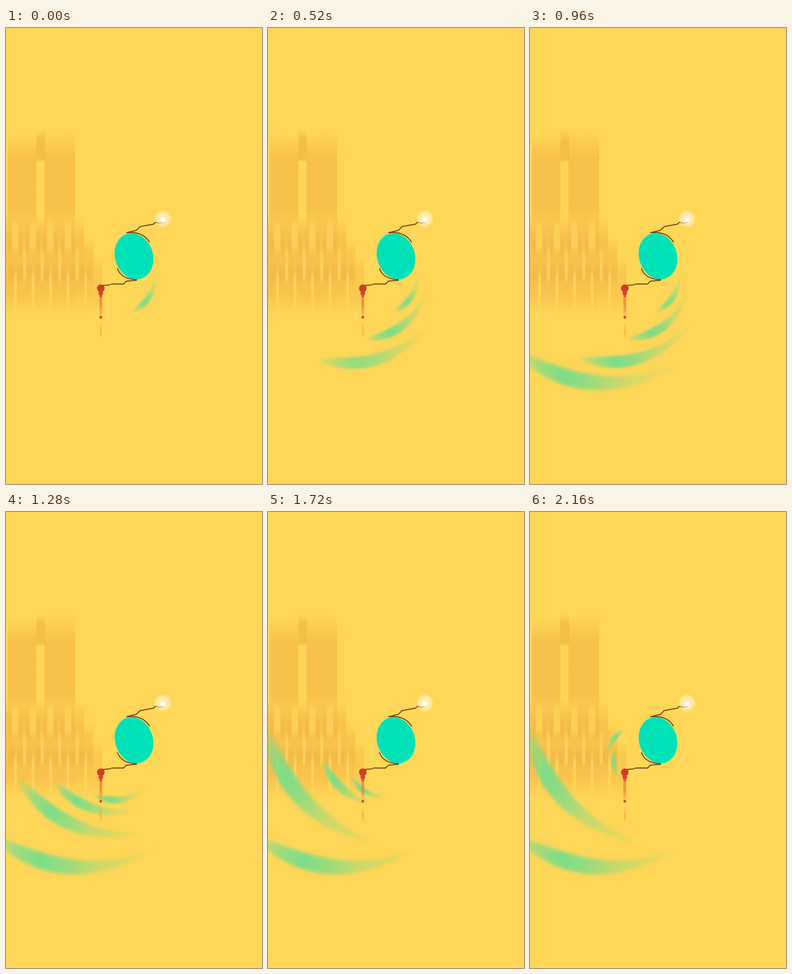
An HTML page with a canvas that plays this animation: 540x960 px, repeating every 2.2 s.

```html
<!DOCTYPE html>
<html lang="en">
<head>
<meta charset="utf-8">
<title>Orbiting arcs</title>
<style>
  html, body { margin: 0; width: 100%; height: 100%; overflow: hidden; background: #ffd758; }
  canvas { display: block; width: 100vw; height: 100vh; }
</style>
</head>
<body>
<canvas id="stage" width="540" height="960"></canvas>
<script>
const LOOP = 2200, STEP = 40, FADE = 110;
const BODY = { x: 270, y: 480.5 };
const ctx = document.getElementById('stage').getContext('2d');

// Each pair runs from the inner ring to the outer one; lift and turn bend that run.
const waves = [
  { rings: 4, radius: [87, 292], angle: [66, 114], tilt: [-38, -22], length: [103, 370], lift: 1.2, turn: 1 },
  { rings: 3, radius: [127, 217], angle: [101, 123], tilt: [-20, -12], length: [122, 312], lift: 1.2, turn: 0.3 },
  { rings: 3, radius: [126, 229], angle: [117, 142], tilt: [-3, -9], length: [95, 376], lift: 2, turn: 0.55 },
  { rings: 2, radius: [99, 109], angle: [176, 147], tilt: [28, 17], length: [76, 72], lift: 1, turn: 1 }
];

const rad = deg => deg * Math.PI / 180;
const mix = ([a, b], p) => a + (b - a) * p;
const ramp = v => { v = Math.max(0, Math.min(1, v)); return v * v * (3 - 2 * v); };

const startOf = (wave, ring) => wave ? 600 + 440 * wave + 60 * ring : 280 * ring - 120;

// An arc stays until the next wave has one for the same ring.
const endOf = (wave, ring) =>
  waves[wave + 1]?.rings > ring ? startOf(wave + 1, ring) : Infinity;

function shade(g, rgb, stops) {
  for (const [at, alpha] of stops) g.addColorStop(at, `rgba(${rgb},${alpha})`);
  return g;
}

function fadeBar(c, x, y, w, h, rgb, alpha, from, to) {
  c.fillStyle = shade(c.createLinearGradient(0, y, 0, y + h), rgb,
    [[0, 0], [from, alpha], [to, alpha], [1, 0]]);
  c.fillRect(x, y, w, h);
}

function makeBackdrop() {
  const layer = document.createElement('canvas');
  layer.width = 540;
  layer.height = 960;
  const c = layer.getContext('2d');
  const amber = '244,184,70', dark = '228,162,52', light = '255,213,92';
  c.fillStyle = '#ffd758';
  c.fillRect(0, 0, 540, 960);
  c.filter = 'blur(0.7px)';

  fadeBar(c, 4, 226, 60, 210, amber, 0.7, 0.22, 0.75);
  fadeBar(c, 81, 218, 65, 218, amber, 0.7, 0.25, 0.75);
  fadeBar(c, 64, 213, 18, 70, dark, 0.45, 0.35, 0.9);

  fadeBar(c, -5, 395, 151, 207, amber, 0.66, 0.18, 0.78);
  for (let i = 0; i < 3; i++) {
    fadeBar(c, 146 + 19 * i, 400 + 42 * i, 19, 200 - 42 * i, amber, 0.65 - 0.1 * i, 0.22, 0.74);
  }
  for (let x = 0; x < 185; x += 37) {
    for (const dx of [5, 23]) fadeBar(c, x + dx, 492, 13, 48, dark, 0.22, 0.3, 0.7);
    if (x < 148) {
      for (const dx of [4, 27]) fadeBar(c, x + dx, 430, 8, 52, dark, 0.2, 0.4, 0.75);
      fadeBar(c, x + 13, 400, 13, 74, light, 0.7, 0.25, 0.8);
      fadeBar(c, x + 36, 460, 7, 76, light, 0.7, 0.2, 0.85);
    }
    fadeBar(c, x + 17, 510, 6, 90, light, 0.85, 0.2, 0.85);
  }
  return layer;
}

function drawArc(wave, ring, t) {
  const w = waves[wave];
  const enter = ramp((t - startOf(wave, ring)) / FADE);
  const alpha = enter * (1 - ramp((t - endOf(wave, ring)) / FADE));
  if (!alpha) return;

  const run = ring / (w.rings - 1);
  const far = run ** w.lift, turned = run ** w.turn;
  const length = mix(w.length, far);
  const width = 4 + 0.085 * length, sag = 0.16 * length;

  ctx.save();
  ctx.translate(BODY.x, BODY.y);
  ctx.rotate(rad(mix(w.angle, turned) - 90 - 7 * (1 - enter)));
  ctx.translate(0, mix(w.radius, far));
  ctx.rotate(rad(mix(w.tilt, turned)));
  ctx.globalAlpha = alpha;
  ctx.filter = `blur(${(1 + width * 0.07).toFixed(1)}px)`;
  ctx.fillStyle = shade(ctx.createLinearGradient(-length / 2, 0, length / 2, 0), '125,220,135',
    [[0, 0.1], [0.14, 0.7], [0.28, 1], [0.42, 0.8], [0.6, 0.42], [0.8, 0.2], [1, 0]]);
  ctx.beginPath();
  // out along one edge, back along the other
  for (let i = 0; i <= 80; i++) {
    const side = i <= 40 ? 1 : -1;
    const s = side > 0 ? i / 40 : (80 - i) / 40;
    const half = width / 2 * Math.max(0, Math.sin(Math.PI * s ** 0.6)) ** 1.1;
    ctx.lineTo(length * (s - 0.5), side * half - sag * (2 * s - 1) ** 2);
  }
  ctx.fill();
  ctx.restore();
}

function line(d, width) {
  ctx.strokeStyle = '#663a10';
  ctx.lineWidth = width;
  ctx.lineJoin = 'round';
  ctx.stroke(new Path2D(d));
}

function dot(x, y, r, color) {
  ctx.fillStyle = color;
  ctx.beginPath();
  ctx.arc(x, y, r, 0, Math.PI * 2);
  ctx.fill();
}

function drawBody() {
  ctx.save();
  ctx.filter = 'blur(0.6px)';
  ctx.fillStyle = '#00e1b8';
  ctx.beginPath();
  ctx.ellipse(BODY.x, BODY.y, 49.3, 40, rad(72), 0, Math.PI * 2);
  ctx.fill();
  ctx.restore();

  line('M254 431 Q288 427 303 451', 2);
  line('M235 506 Q243 529 276 530', 2);
  line('M254 431 L275 426 L283 418 L311 413 L315 409 L324 411 L333 409', 1.8);
  line('M204 542 L218 541 L223 539 L248 539 L254 533 L276 531', 1.8);
}

function drawRed() {
  fadeBar(ctx, 197, 552, 6, 62, '240,120,50', 0.65, 0.15, 0.55);
  fadeBar(ctx, 198, 620, 4, 34, '235,120,55', 0.35, 0.5, 0.65);
  dot(200, 548, 8, '#cd3c2d');
  dot(200, 558, 5, '#d2452f');
  dot(200, 564, 3, '#dc5434');
  dot(200, 609, 2.8, '#cb442b');
}

function drawGlow() {
  dot(331, 402, 19, shade(ctx.createRadialGradient(331, 402, 0, 331, 402, 19), '255,245,212',
    [[0, 0.95], [0.45, 0.72], [0.75, 0.5], [1, 0]]));
  dot(331, 404, 4.5, '#fff');
}

const backdrop = makeBackdrop();
const begin = performance.now();

function draw(now) {
  const t = Math.floor(Math.max(0, now - begin) % LOOP / STEP) * STEP;
  ctx.drawImage(backdrop, 0, 0);
  waves.forEach((w, wave) => {
    for (let ring = 0; ring < w.rings; ring++) drawArc(wave, ring, t);
  });
  drawBody();
  drawRed();
  drawGlow();
  requestAnimationFrame(draw);
}
draw(begin);
</script>
</body>
</html>
```
